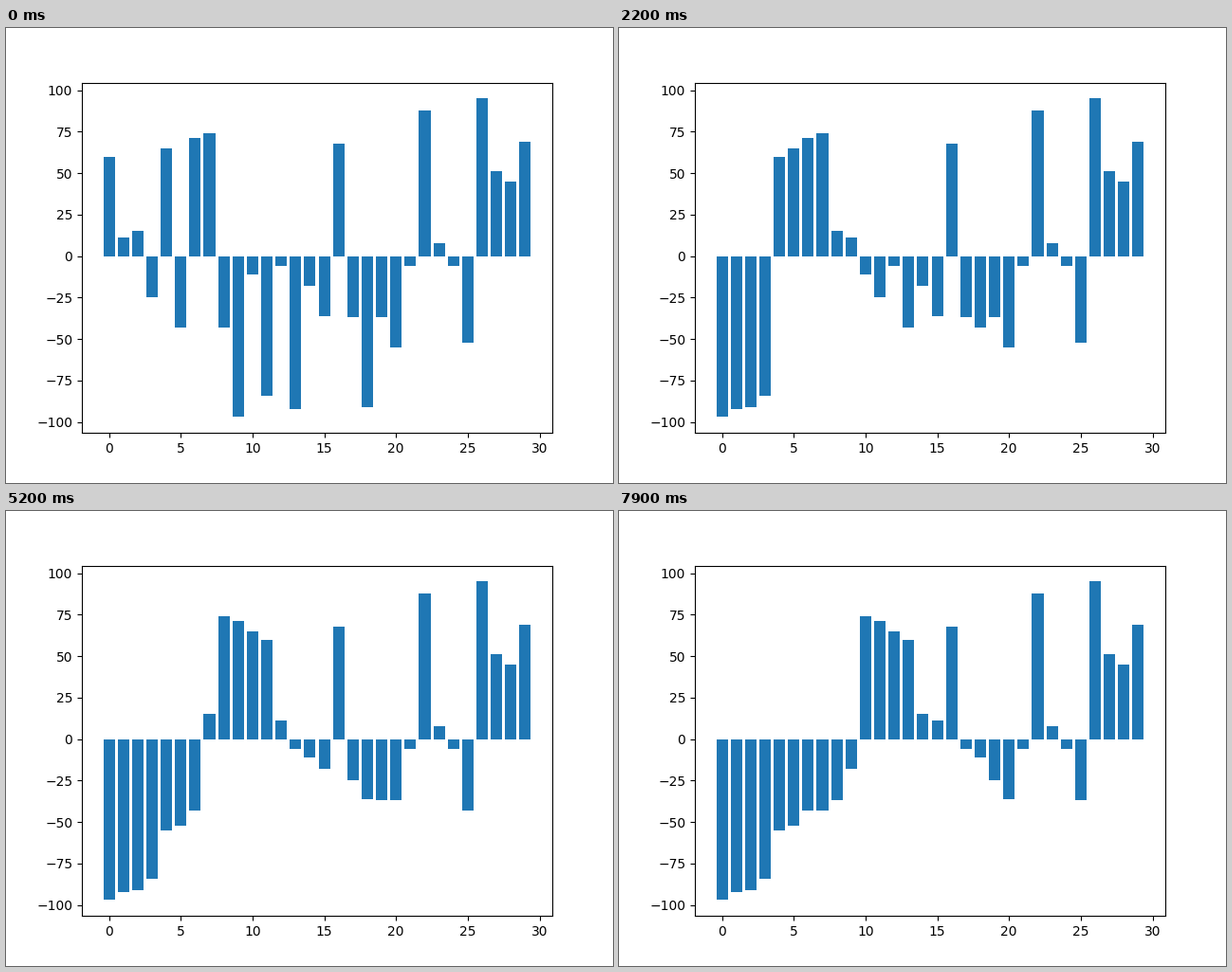
Recreate the animation shown at these times as a matplotlib script. Size 640 px wide and 480 px high, loop 8 s.

```python
import matplotlib.pyplot as plt
from matplotlib.animation import FuncAnimation

FRAMES = 80
INTERVAL = 100

# The unsorted data; every later state follows from the sort.
START = [60, 11, 15, -25, 65, -43, 71, 74, -43, -97,
         -11, -84, -6, -92, -18, -36, 68, -37, -91, -37,
         -55, -6, 88, 8, -6, -52, 95, 51, 45, 69]


def exchange_sort(values):
    """Yield the list at the start and after every swap."""
    a = list(values)
    yield a[:]
    for i in range(len(a)):
        for j in range(i + 1, len(a)):
            if a[j] < a[i]:
                a[i], a[j] = a[j], a[i]
                yield a[:]


states = list(exchange_sort(START))[:FRAMES]

# Whole-pixel kerning for the tick labels.
plt.rcParams["text.kerning_factor"] = 6

fig, ax = plt.subplots(figsize=(6.4, 4.8), dpi=100)
bars = ax.bar(range(len(START)), START)
# Sorting never changes the extremes, so the limits stay put.
ax.set_xlim(ax.get_xlim())
ax.set_ylim(ax.get_ylim())


def update(frame):
    for bar, height in zip(bars, states[frame]):
        bar.set_height(height)
    return list(bars)


anim = FuncAnimation(fig, update, frames=FRAMES, interval=INTERVAL,
                     repeat=True, repeat_delay=0)
plt.show()
```
